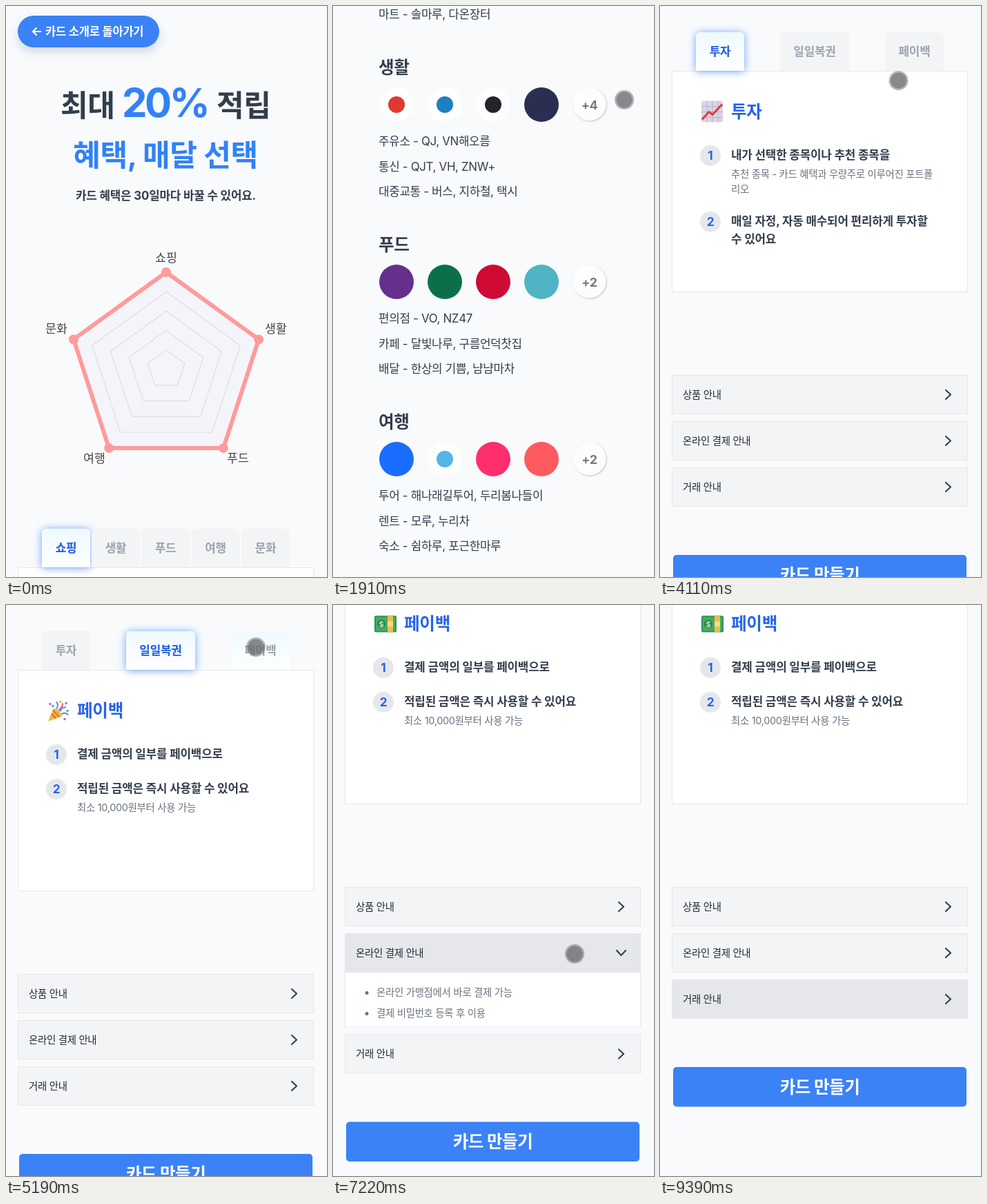
An HTML page for the animation above (9860 ms loop, 465x828 px).

```html
<!DOCTYPE html>
<html lang="ko">
<head>
<meta charset="utf-8">
<title>카드 혜택</title>
<style>
  html, body { margin: 0; width: 100%; height: 100%; overflow: hidden; background: #f8fafc; }
  #stage { display: block; width: 465px; height: 828px; }
  text {
    font-family: Inter, "Noto Sans CJK KR", "Noto Sans CJK JP", sans-serif;
    letter-spacing: -.019em;
    white-space: pre;
  }
  text[font-weight="700"] { letter-spacing: -.011em; }
  .label { font-family: "Noto Sans CJK KR", "Noto Sans CJK JP", sans-serif; letter-spacing: 0; }
  .lift { filter: drop-shadow(0 7px 7px rgba(30, 50, 90, .16)); }
  .badge { filter: drop-shadow(1px 1px 1px rgba(0, 0, 0, .22)); }
  .glow { filter: drop-shadow(0 1px 6px rgba(59, 130, 246, .75)); }
</style>
</head>
<body>
<svg id="stage" viewBox="0 0 465 828">
  <defs>
    <linearGradient id="skin" x1="0" y1="0" x2="0" y2="1">
      <stop offset="0" stop-color="#eefaff"/>
      <stop offset="1" stop-color="#ffffff"/>
    </linearGradient>
  </defs>
</svg>
<script>
const LOOP = 9860;
const INK = '#333d4b', BLUE = '#3182f6', DEEP = '#2563eb', BTN = '#3b82f6';
const LINE = '#e5e7eb', SOFT = '#f3f4f6', MUTED = '#6b7280', DIM = '#9ca3af';
const HERO = 45;
const stage = document.getElementById('stage');

const el = (parent, tag, attrs = {}, text = '') => {
  const n = document.createElementNS('http://www.w3.org/2000/svg', tag);
  for (const k in attrs) n.setAttribute(k, attrs[k]);
  if (text) n.textContent = text;
  parent.appendChild(n);
  return n;
};
const group = (parent, attrs) => el(parent, 'g', attrs);
const rect = (p, x, y, width, height, fill, more) => el(p, 'rect', { x, y, width, height, fill, ...more });
const disc = (p, cx, cy, r, fill, more) => el(p, 'circle', { cx, cy, r, fill, ...more });
const line = (p, d, stroke, width, more) =>
  el(p, 'path', { d, stroke, fill: 'none', 'stroke-width': width, ...more });

// Text placed by its vertical middle.
const write = (p, s, x, mid, size, fill = INK, weight = 400, more = {}) => {
  const px = size * .96;
  return el(p, 'text', { x, y: mid + px * .37, 'font-size': px, fill, 'font-weight': weight, ...more }, s);
};
const MIDDLE = { 'text-anchor': 'middle' };

const page = group(stage);

// Header
rect(page, 17, 14, 205, 46, BTN, { rx: 23, class: 'lift' });
line(page, 'M51 37H39.5M44.5 31.5L39 37L44.5 42.5', '#fff', 2.2);
write(page, '카드 소개로 돌아가기', 57, 37, 17.3, '#fff', 600);

write(page, '최대', 79, 144, HERO, INK, 700);
el(page, 'text', { x: 168, y: 161, 'font-size': 58, 'font-weight': 700, fill: BLUE, style: 'letter-spacing:-.06em' }, '20%');
write(page, '적립', 305, 144, HERO, INK, 700);
write(page, '혜택, 매달 선택', 231, 216.5, HERO, BLUE, 700, MIDDLE);
write(page, '카드 혜택은 30일마다 바꿀 수 있어요.', 231.5, 275, 17.6, INK, 700, MIDDLE);

// Radar chart
const corners = r => Array.from({ length: 5 }, (_, i) => {
  const a = i * Math.PI * .4;
  return [232 + r * Math.sin(a), 527 - r * Math.cos(a)];
});
const pentagon = (r, fill, stroke, width) =>
  el(page, 'polygon', { points: corners(r).join(' '), fill, stroke, 'stroke-width': width, 'stroke-linejoin': 'round' });
pentagon(141, '#f4f5fb', '#ff9b9b', 6);
for (let i = 1; i < 5; i++) pentagon(28.2 * i, 'none', '#dcdfe4', 1.2);
corners(141).forEach(([x, y]) => disc(page, x, y, 7, '#ff9b9b'));
[['쇼핑', 232, 365], ['생활', 391, 468], ['푸드', 336, 656], ['여행', 128, 656], ['문화', 73, 468]]
  .forEach(([s, x, y]) => write(page, s, x, y, 18, '#444', 300, { ...MIDDLE, class: 'label' }));

// Tabs
const tabBar = (y, tabs) => tabs.map(([name, x, w]) => {
  const d = `M${x} ${y + 56}v-49q0-7 7-7h${w - 14}q7 0 7 7v49z`;
  const put = fill => write(page, name, x + w / 2, y + 28, 17.6, fill, 700, MIDDLE);
  el(page, 'path', { d, fill: SOFT });
  const glow = el(page, 'path', { d, fill: '#fff', class: 'glow' });
  const skin = el(page, 'path', { d, fill: 'url(#skin)' });
  put(DIM);
  const lit = put(DEEP);
  return (press, on) => {
    skin.setAttribute('opacity', press);
    glow.setAttribute('opacity', on);
    lit.setAttribute('opacity', on);
  };
});
const panelBox = y => rect(page, 17.5, y + .5, 428, 320, '#fff', { stroke: LINE });

// Small pictures in a 32px box
const art = {
  bag(g) {
    rect(g, 4, 10, 24, 21, '#f4a340', { rx: 3 });
    line(g, 'M10 14V9a6 6 0 0 1 12 0v5', '#b86a1c', 2.2);
  },
  chart(g) {
    rect(g, 0, 0, 31, 31, '#dad5e6', { rx: 3 });
    line(g, 'M8 0V31M16 0V31M24 0V31M0 8H31M0 16H31M0 24H31', '#b8b1c9', 1);
    line(g, 'M1 27L11 16L16 20L30 5', '#e03a3c', 3, { 'stroke-linejoin': 'round' });
  },
  party(g) {
    el(g, 'path', { d: 'M1 31L9 12Q18 14 21 24Z', fill: '#f7b23b' });
    line(g, 'M6 20L12 27M8 15L17 25', '#d9782c', 2.2);
    line(g, 'M13 13Q17 8 13 3M18 17Q21 10 27 11M20 21Q26 17 30 22', '#4a9be8', 2.2);
    line(g, 'M16 15Q22 11 22 5', '#ef5a7a', 2.2);
    [[4, 6, '#ef5a7a'], [19, 3, '#f7b23b'], [27, 5, '#ef5a7a'], [29, 16, '#4db36a'], [25, 28, '#ef5a7a'], [8, 9, '#4a9be8']]
      .forEach(([x, y, c]) => disc(g, x, y, 1.7, c));
  },
  cash(g) {
    rect(g, 0, 4, 32, 24, '#2f9350', { rx: 2 });
    rect(g, 2, 6, 28, 20, '#47ab63', { rx: 1 });
    disc(g, 10, 16, 6, '#2a8549');
    el(g, 'text', { x: 10, y: 20, 'font-size': 11, 'font-weight': 600, fill: '#d5efdc', ...MIDDLE }, '$');
    rect(g, 19, 4, 8, 24, '#e9bd4f');
    rect(g, 19, 12, 8, 8, '#f6d987');
  }
};

// Each step: offset from panel top, bold lines, small lines
const panel = (y, name, icon, steps) => {
  const g = group(page);
  const pic = group(g, { transform: `translate(60 ${y + 43.5})` });
  art[icon](pic);
  write(g, name, 103, y + 59, 25.6, DEEP, 700);
  steps.forEach(([dy, bold, small = []], i) => {
    disc(g, 73, y + dy + 1.5, 15, LINE);
    write(g, String(i + 1), 73, y + dy + 1.5, 18, DEEP, 700, MIDDLE);
    bold.forEach((s, k) => write(g, s, 103, y + dy + k * 26, 17.6, INK, 700));
    small.forEach((s, k) => write(g, s, 103, y + dy + 28.5 + k * 22, 15, MUTED));
  });
  return { g, pic };
};

panelBox(814);
tabBar(758, [['쇼핑', 52, 70], ['생활', 124, 70], ['푸드', 196, 70], ['여행', 268.5, 70], ['문화', 341, 70]])
  .forEach((set, i) => set(+!i, +!i));
panel(814, '쇼핑', 'bag', [
  [121.5, ['온라인 쇼핑 결제 금액 적립']],
  [171.5, ['마트에서도 똑같이 적립돼요'], ['전월 실적에 따라 최대 20% 적립']]
]);

// Benefit list: W() is a white disc with a small dot on it
const W = c => ['#fdfefe', c];
const benefits = [
  ['쇼핑', ['#e8334a', W('#1ea45c'), '#222a3a', '#ffc83d'], '+2',
    ['온라인 - 모아별장, 두루가게', '패션 - 옷다솜, 나들결', '마트 - 솔마루, 다온장터']],
  ['생활', [W('#e0392f'), W('#1e7fc0'), W('#23252b'), '#2a2f52'], '+4',
    ['주유소 - QJ, VN해오름', '통신 - QJT, VH, ZNW+', '대중교통 - 버스, 지하철, 택시']],
  ['푸드', ['#652f8d', '#0b7049', '#cf0a35', '#4fb4c4'], '+2',
    ['편의점 - VO, NZ47', '카페 - 달빛나루, 구름언덕찻집', '배달 - 한상의 기쁨, 냠냠마차']],
  ['여행', ['#1a6dff', W('#55b4e6'), '#ff2f6e', '#ff5a5f'], '+2',
    ['투어 - 해나래길투어, 두리봄나들이', '렌트 - 모루, 누리차', '숙소 - 쉼하루, 포근한마루']],
  ['문화', [W('#d5222a'), '#ff153c', '#da291c', '#a259f0'], '+2',
    ['OTT - 모아별빛, 보름', '영화 - QVN, 솔별시네마', '도서 - 노을의 책방, 새솔글방']]
];
benefits.forEach(([name, marks, more, rows], i) => {
  const y = 1331.5 + 257 * i;
  write(page, name, 66, y, 25.6, INK, 700);
  marks.forEach((c, k) => {
    const [base, dot] = [].concat(c);
    disc(page, 92 + 70 * k, y + 54.5, 25, base);
    if (dot) disc(page, 92 + 70 * k, y + 54.5, 12, dot);
  });
  disc(page, 371.5, y + 54, 24, '#fdfdfd', { class: 'badge' });
  write(page, more, 371.5, y + 54.5, 18.5, '#777', 700, MIDDLE);
  rows.forEach((s, k) => write(page, s, 66, y + 107.7 + 36.3 * k, 17.6));
});

// Points section
const duo = (dark, blue, mid) => {
  const t = write(page, '', 231, mid, HERO, INK, 700, MIDDLE);
  el(t, 'tspan', {}, dark + ' ');
  el(t, 'tspan', { fill: BLUE }, blue);
};
duo('재미있는', '포인트 사용처', 2741);
duo('원할 때', '켜고 끄세요', 2809);

panelBox(2969);
const tabs = tabBar(2913, [['투자', 52, 70], ['일일복권', 174, 100], ['페이백', 326, 85]]);
const panels = [
  panel(2969, '투자', 'chart', [
    [121.5, ['내가 선택한 종목이나 추천 종목을'], ['추천 종목 - 카드 혜택과 우량주로 이루어진 포트폴', '리오']],
    [217.5, ['매일 자정, 자동 매수되어 편리하게 투자할', '수 있어요']]
  ]),
  panel(2969, '일일복권', 'party', [
    [121.5, ['매일 한 번 복권을 긁어보세요']],
    [171.5, ['당첨되면 바로 포인트로 드려요'], ['매일 자정에 새 복권 지급']]
  ]),
  panel(2969, '페이백', 'cash', [
    [121.5, ['결제 금액의 일부를 페이백으로']],
    [171.5, ['적립된 금액은 즉시 사용할 수 있어요'], ['최소 10,000원부터 사용 가능']]
  ])
];
const oldPic = group(page, { transform: 'translate(60 3012.5)' });
art.party(oldPic);

// Accordion
const fold = (y, name, rows) => {
  const g = group(page);
  const body = el(g, 'svg', { x: 17, y: y + 56, width: 429, height: 1 });
  const box = rect(body, .5, -1, 428, 1, '#fff', { stroke: LINE });
  rows.forEach((s, k) => {
    disc(body, 32, 30.5 + 30 * k, 2.5, MUTED);
    write(body, s, 46, 29.5 + 30 * k, 15, MUTED);
  });
  const head = rect(g, 17.5, y + .5, 428, 56, SOFT, { stroke: LINE });
  write(g, name, 33, y + 28.5, 15, '#1f2937');
  const arrow = line(g, 'M-3.5 -6.5L3.5 0L-3.5 6.5', '#374151', 2.2, { 'stroke-linecap': 'round', 'stroke-linejoin': 'round' });
  return (shift, h, open, hot) => {
    g.setAttribute('transform', `translate(0 ${shift})`);
    body.setAttribute('display', h > 0 ? 'inline' : 'none');
    body.setAttribute('height', h + 1);
    box.setAttribute('height', h + 1.5);
    head.setAttribute('fill', hot ? LINE : SOFT);
    arrow.setAttribute('transform', `translate(417.5 ${y + 28.5}) rotate(${open ? 90 : 0})`);
  };
};
const folds = [
  fold(3410, '상품 안내', ['발급대상: 솔내은행 계좌를 갖고 있는 19세 이상 고객', '연회비: 없음', '발급수수료: 2,000원', '상품안내서/개인회원 약관 확인']),
  fold(3477, '온라인 결제 안내', ['온라인 가맹점에서 바로 결제 가능', '결제 비밀번호 등록 후 이용']),
  fold(3544, '거래 안내', ['국내 모든 가맹점에서 사용 가능', '거래 내역은 앱에서 확인'])
];
const cta = group(page);
rect(cta, 19, 3671, 425, 57.5, BTN, { rx: 5 });
write(cta, '카드 만들기', 231.5, 3699.5, 25.6, '#fff', 800, MIDDLE);

const cursor = group(stage);
disc(cursor, 0, 0, 14, 'rgba(110,110,110,.5)');
disc(cursor, 0, 0, 11.5, 'rgba(100,100,105,.55)');

// Moves: [start, duration, value...]
const scrollMoves = [
  [70, 660, 750], [1010, 0, 1000], [1500, 0, 1200], [1570, 0, 1250], [1910, 0, 1500],
  [2260, 0, 1700], [2330, 0, 1750], [2600, 0, 1950], [2670, 0, 2000], [3020, 0, 2200],
  [3080, 0, 2250], [3280, 0, 2375], [3350, 0, 2500], [3530, 380, 2875], [5580, 200, 3001]
];
const cursorMoves = [
  [70, 400, 422, 136], [3950, 380, 224, 64], [4600, 480, 362, 61], [5700, 320, 363, 449],
  [6640, 380, 350, 506], [8300, 130, 342, 549], [8990, 380, 300, 790]
];
// Open start, open duration, close start, close duration, height
const foldTimes = [[6030, 230, 6400, 240, 150], [7040, 230, 7950, 150, 90], [8430, 150, 8780, 210, 90]];
const hotFrom = [6030, 7040, 8460, Infinity];
const tapAt = [-Infinity, 4400, 5180, Infinity];

const ramp = (t, start, dur) => {
  const k = dur ? Math.min(1, Math.max(0, (t - start) / dur)) : +(t >= start);
  return k * k * (3 - 2 * k);
};
const follow = (moves, t, from, col = 2) =>
  moves.reduce((v, m) => v + (m[col] - v) * ramp(t, m[0], m[1]), from);
const show = (n, on) => n.setAttribute('display', on ? 'inline' : 'none');

function draw(t) {
  page.setAttribute('transform', `translate(0 ${-follow(scrollMoves, t, 0)})`);

  show(cursor, t >= 70 && t < 9390);
  cursor.setAttribute('transform', `translate(${follow(cursorMoves, t, 400)} ${follow(cursorMoves, t, -20, 3)})`);

  tabs.forEach((set, i) => {
    const on = i ? ramp(t, tapAt[i] + 15, 220) : 1;
    const off = ramp(t, tapAt[i + 1] + 15, 220);
    set(t >= tapAt[i] ? 1 - off : 0, on * (1 - off));
    show(panels[i].g, t >= tapAt[i] && t < tapAt[i + 1]);
  });
  const late = t >= tapAt[2] && t < 5250;
  show(oldPic, late);
  show(panels[2].pic, !late);

  let shift = 0;
  folds.forEach((set, i) => {
    const [a, da, b, db, full] = foldTimes[i];
    const h = full * (ramp(t, a, da) - ramp(t, b, db));
    set(shift, h, t >= a && t < b, t >= hotFrom[i] && t < hotFrom[i + 1]);
    shift += h;
  });
  cta.setAttribute('transform', `translate(0 ${shift})`);
}

const began = performance.now();
const tick = () => {
  draw((performance.now() - began) % LOOP);
  requestAnimationFrame(tick);
};
tick();
</script>
</body>
</html>
```
